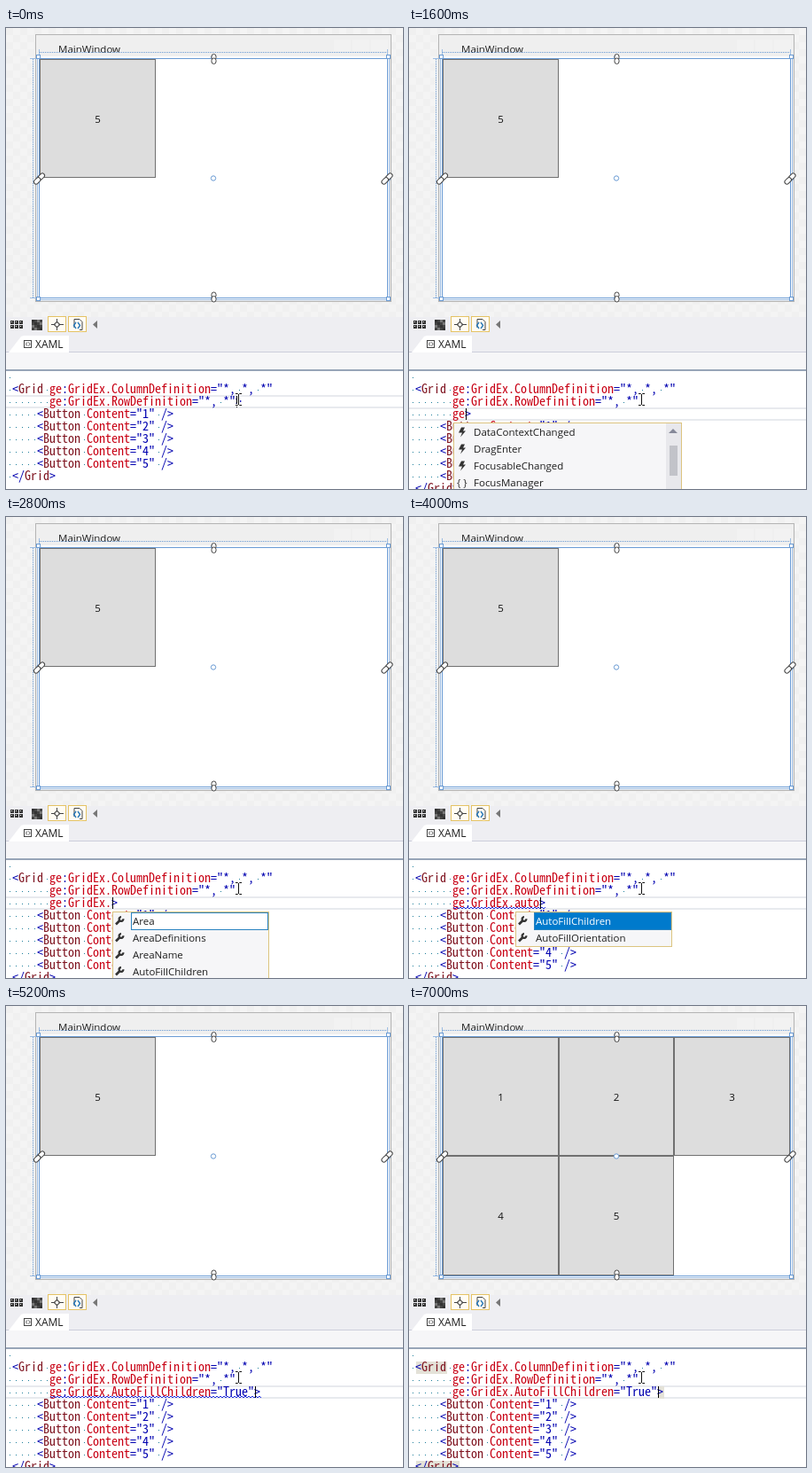
Recreate the animation shown at these times as an HTML page with a canvas. Size 448x520 px, loop 7.2 s.

```html
<!DOCTYPE html>
<html lang="en">
<head>
<meta charset="utf-8">
<title>Grid auto fill</title>
<style>
html, body { margin: 0; width: 448px; height: 520px; overflow: hidden; background: #fff; }
canvas { display: block; }
</style>
</head>
<body>
<canvas id="stage" width="448" height="520"></canvas>
<script>
const ctx = document.getElementById('stage').getContext('2d');
const LOOP = 7200, STEP = 200, BLINK = 530;
const CELL = 7, ROW = 14, CODE_X = 0, CODE_Y = 398, INDENT = 7;
const UI = '"Open Sans", "Noto Sans", sans-serif';
const MONO = '"Noto Sans Mono CJK JP", "Liberation Mono", monospace';

// Pick the size whose advance equals one editor cell.
ctx.font = `14px ${MONO}`;
const codeFont = `${14 * CELL / ctx.measureText('0').width}px ${MONO}`;

// Time and content of the new attribute after each key stroke.
const typed = [
  [800, ''], [1400, 'g'], [1600, 'ge'], [1800, 'ge:'], [2000, 'ge:G'], [2200, 'ge:Gri'],
  [2400, 'ge:GridEx'], [2600, 'ge:GridEx.'], [3200, 'ge:GridEx.a'], [3400, 'ge:GridEx.au'],
  [3600, 'ge:GridEx.aut'], [3800, 'ge:GridEx.auto'], [4200, 'ge:GridEx.AutoFillChildren=""'],
  [4400, 'ge:GridEx.AutoFillChildren="T"'], [4600, 'ge:GridEx.AutoFillChildren="True"']
];
const LAST_KEY = 4800;

const eventList = { x: 50, w: 258, icon: 'bolt', scroll: true,
  items: ['DataContextChanged', 'DragEnter', 'FocusableChanged', 'FocusManager'] };
const memberList = { x: 120, w: 177, icon: 'wrench', mark: 'outline',
  items: ['Area', 'AreaDefinitions', 'AreaName', 'AutoFillChildren'] };
const autoList = { x: 120, w: 177, icon: 'wrench', mark: 'fill',
  items: ['AutoFillChildren', 'AutoFillOrientation'] };

function fill(x, y, w, h, color) {
  ctx.fillStyle = color;
  ctx.fillRect(x, y, w, h);
}

function frame(x, y, w, h, color) {
  ctx.strokeStyle = color;
  ctx.lineWidth = 1;
  ctx.strokeRect(x + .5, y + .5, w - 1, h - 1);
}

function line(points, color, width = 1) {
  ctx.strokeStyle = color;
  ctx.lineWidth = width;
  ctx.beginPath();
  points.forEach(([x, y]) => ctx.lineTo(x, y));
  ctx.stroke();
}

function poly(points, color) {
  ctx.fillStyle = color;
  ctx.beginPath();
  points.forEach(([x, y]) => ctx.lineTo(x, y));
  ctx.fill();
}

function label(text, x, y, color = '#1e1e1e', size = 11.5, align = 'left') {
  ctx.font = `${size}px ${UI}`;
  ctx.textAlign = align;
  ctx.fillStyle = color;
  ctx.fillText(text, x, y);
  ctx.textAlign = 'left';
}

function circle(x, y, r, color) {
  ctx.beginPath();
  ctx.arc(x, y, r, 0, 7);
  ctx.fillStyle = '#fff';
  ctx.fill();
  ctx.strokeStyle = color;
  ctx.lineWidth = 1;
  ctx.stroke();
}

function chain(x, y, angle, length) {
  ctx.save();
  ctx.translate(x, y);
  ctx.rotate(angle);
  ctx.strokeStyle = '#444';
  ctx.fillStyle = '#fff';
  ctx.lineWidth = 1;
  for (const top of [-length / 2, -1]) {
    ctx.beginPath();
    ctx.roundRect(-2.5, top, 5, length / 2 + 1, 2.5);
    ctx.fill();
    ctx.stroke();
  }
  ctx.restore();
}

function drawDesigner(filled) {
  const blue = '#6a9bd4', pale = '#9dbde3';
  fill(0, 0, 448, 326, '#f4f4f4');
  for (let y = 0; y < 326; y += 8)
    for (let x = (y / 8 % 2) * 8; x < 448; x += 16) fill(x, y, 8, 8, '#f0f0f0');

  fill(33, 7, 402, 301, '#efefef');
  frame(33, 7, 402, 302, '#b4b4b4');
  for (let i = 0; i < 3; i++) fill(370 + i * 21, 13, 19, 13, '#f2f2f2');
  label('MainWindow', 59, 28);
  fill(35, 32, 398, 275, '#fff');

  const xs = [38, 169, 299, 430], ys = [35, 169, 304];
  for (let i = 0; i < (filled ? 5 : 1); i++) {
    const c = i % 3, r = Math.floor(i / 3);
    const w = xs[c + 1] - xs[c], h = ys[r + 1] - ys[r];
    fill(xs[c], ys[r], w, h, '#ddd');
    frame(xs[c], ys[r], w, h, '#707070');
    label(filled ? i + 1 : 5, xs[c] + w / 2, ys[r] + 72, '#111', 11.5, 'center');
  }

  ctx.setLineDash([1, 1]);
  line([[38, 27.5], [431, 27.5]], blue);
  line([[30.5, 35], [30.5, 304]], blue);
  ctx.setLineDash([]);
  for (const x of [37.5, 430.5]) line([[x, 24], [x, 34]], pale);
  for (const y of [34.5, 304.5]) line([[27, y], [37, y]], pale);
  frame(37, 34, 394, 271, blue);
  for (const x of [35.5, 432.5]) line([[x, 32], [x, 307]], pale);
  line([[35, 306.5], [433, 306.5]], pale);
  for (const x of [34, 429]) for (const y of [30, 303]) {
    fill(x, y, 5, 5, '#fff');
    frame(x, y, 5, 5, blue);
  }
  circle(234, 169.5, 2.7, blue);
  for (const x of [37, 431.5]) circle(x, 169.5, 2.5, blue);
  for (const y of [33.5, 304.5]) circle(234, y, 2.5, blue);
  chain(234.5, 35, 0, 11);
  chain(234.5, 303.5, 0, 11);
  chain(37.5, 170, Math.PI / 4, 15);
  chain(430, 170, Math.PI / 4, 15);
}

function drawToolbar() {
  fill(0, 326, 448, 61, '#eeeef2');
  for (const x of [47, 70]) {
    fill(x, 325, 21, 18, '#fffcf4');
    frame(x, 325, 21, 18, '#e5c365');
  }
  for (let r = 0; r < 2; r++) for (let c = 0; c < 3; c++) {
    fill(5 + c * 5, 330 + r * 5, 4, 4, '#333');
    fill(6 + c * 5, 331 + r * 5, 1, 1, '#eee');
  }
  fill(29, 329, 12, 12, '#444');
  for (let r = 0; r < 4; r++) for (let c = r % 2; c < 4; c += 2)
    fill(29 + c * 3, 329 + r * 3, 3, 3, r < 2 === c < 2 ? '#333' : '#777');
  line([[51, 334.5], [65, 334.5]], '#444');
  line([[57.5, 328], [57.5, 341]], '#444');
  poly([[57.5, 330.5], [61.5, 334.5], [57.5, 338.5], [53.5, 334.5]], '#444');
  circle(57.5, 334.5, 1.5, '#fffcf4');
  line([[77, 338], [77, 328.5], [83, 328.5], [86, 331.5], [86, 340.5], [83, 340.5]], '#444');
  line([[79, 332], [76.5, 335.5], [79, 339]], '#2878b8', 1.4);
  line([[81, 332], [83.5, 335.5], [81, 339]], '#2878b8', 1.4);
  poly([[103, 330], [103, 339], [98, 334.5]], '#777');

  fill(0, 366, 448, 20, '#f6f6f8');
  fill(0, 365, 448, 1, '#cccedb');
  poly([[3, 366], [17, 348], [20, 347], [71, 347], [71, 366]], '#fff');
  fill(0, 385, 448, 2, '#98a5b8');
  frame(20, 352, 9, 9, '#444');
  line([[24, 354.5], [22.5, 356.5], [24, 358.5]], '#444');
  line([[25.5, 354.5], [27, 356.5], [25.5, 358.5]], '#444');
  label('XAML', 33, 361, '#1e1e1e', 12);
}

function drawCode(text, row) {
  const y = CODE_Y + row * ROW;
  ctx.font = codeFont;
  let inTagName = false;
  for (const { 0: token, index } of text.matchAll(/"[^"]*"?|[<>\/=:]+|[\w.]+|\s/g)) {
    const isWord = /^\w/.test(token);
    ctx.fillStyle = !isWord ? '#0000b0' : inTagName ? '#7f1420' : '#c80014';
    ctx.fillText(token, CODE_X + index * CELL, y);
    inTagName = token[0] === '<';
  }
  [...text].forEach((ch, i) => {
    if (ch === ' ') fill(CODE_X + i * CELL + 4, y - 4, 1, 1, '#1f7f9c');
  });
}

function highlight(col, count, row) {
  fill(CODE_X + col * CELL + 1, CODE_Y + row * ROW - 11, count * CELL, ROW, '#e4e2d8');
}

function drawSquiggle(cols) {
  const x = CODE_X + INDENT * CELL + 1, points = [];
  for (let dx = 0; dx <= cols * CELL; dx += 2) points.push([x + dx, 440 + dx / 2 % 2 * 2]);
  line(points, '#2030e0');
}

function drawIcon(kind, x, y) {
  if (kind === 'bolt') {
    poly([[x - 1, y - 5], [x + 3, y - 5], [x + 1, y - 1], [x + 4, y - 1],
      [x - 2, y + 6], [x, y + 1], [x - 4, y + 1]], '#333');
  } else if (kind === 'wrench') {
    line([[x - 4, y + 4], [x + 1, y - 1]], '#333', 2.6);
    ctx.lineWidth = 2.2;
    ctx.beginPath();
    ctx.arc(x + 2, y - 2, 2.4, -.1, 4.7);
    ctx.stroke();
  } else {
    label('{ }', x - 6, y + 4, '#333', 11.5);
  }
}

function drawPopup({ x, w, icon, mark, scroll, items }) {
  const h = items.length > 2 ? 90 : 40;
  fill(x, 445, w, h, '#f6f6f8');
  if (mark) {
    fill(x + 21, 446, w - 22, 19, mark === 'fill' ? '#007acc' : '#fff');
    frame(x + 21, 446, w - 22, 20, '#2a83c0');
  }
  items.forEach((name, i) => {
    const y = 455.5 + i * 19;
    drawIcon(name === 'FocusManager' ? 'braces' : icon, x + (scroll ? 10 : 8), y);
    label(name, x + 23, y + 4, mark === 'fill' && !i ? '#fff' : '#1e1e1e');
  });
  if (scroll) {
    fill(x + w - 18, 446, 17, 90, '#e8e8ec');
    poly([[293, 457], [303, 457], [298, 452]], '#868999');
    fill(294, 471, 9, 34, '#c2c3c9');
  }
  frame(x, 445, w, h, '#dcc480');
}

function drawPointer() {
  for (const [color, width] of [['#fff', 3], ['#111', 1]]) {
    line([[262.5, 413], [262.5, 425]], color, width);
    line([[259, 412.5], [261.5, 412.5], [262.5, 413.5], [263.5, 412.5], [266, 412.5]], color, width);
    line([[259, 425.5], [261.5, 425.5], [262.5, 424.5], [263.5, 425.5], [266, 425.5]], color, width);
  }
}

function drawEditor(t) {
  const [keyTime, attr] = typed.filter(([at]) => at <= t).pop() || [0, null];
  const added = attr !== null;
  const pad = ' '.repeat(INDENT);
  const rows = [' ', ' <Grid ge:GridEx.ColumnDefinition="*, *, *"',
    pad + 'ge:GridEx.RowDefinition="*, *"' + (added ? '' : '>')];
  if (added) rows.push(pad + attr + '>');
  for (let i = 1; i <= 5; i++) rows.push(`     <Button Content="${i}" />`);
  rows.push(' </Grid>');

  const current = added ? 3 : 2;
  const y = CODE_Y + current * ROW;
  fill(0, 387, 448, 133, '#fff');
  for (const top of [y - 12, y + 1]) fill(0, top, 448, 2, '#e8eaee');
  if (t >= 6200) {
    highlight(1, 5, 1);
    highlight(INDENT + attr.length, 1, 3);
    highlight(1, 7, 9);
  }
  rows.forEach(drawCode);
  if (t >= 3400 && t < 5400) drawSquiggle(attr.length + 1);

  const insideQuote = t >= 4200 && t < LAST_KEY;
  const caretCol = rows[current].length - 1 - (insideQuote ? 1 : 0);
  const since = t - (t >= LAST_KEY ? LAST_KEY : keyTime);
  if (Math.floor(since / BLINK) % 2 === 0)
    fill(CODE_X + caretCol * CELL + 1, y - 11, 1, 13, '#000');

  if (t >= 1400 && t < 1800) drawPopup(eventList);
  else if (t >= 2600 && t < 3400) drawPopup(memberList);
  else if (t >= 3400 && t < 4200) drawPopup(autoList);
  drawPointer();
}

function render() {
  const t = Math.floor(performance.now() % LOOP / STEP) * STEP;
  drawDesigner(t >= 5400);
  drawToolbar();
  drawEditor(t);
  requestAnimationFrame(render);
}
render();
</script>
</body>
</html>
```
